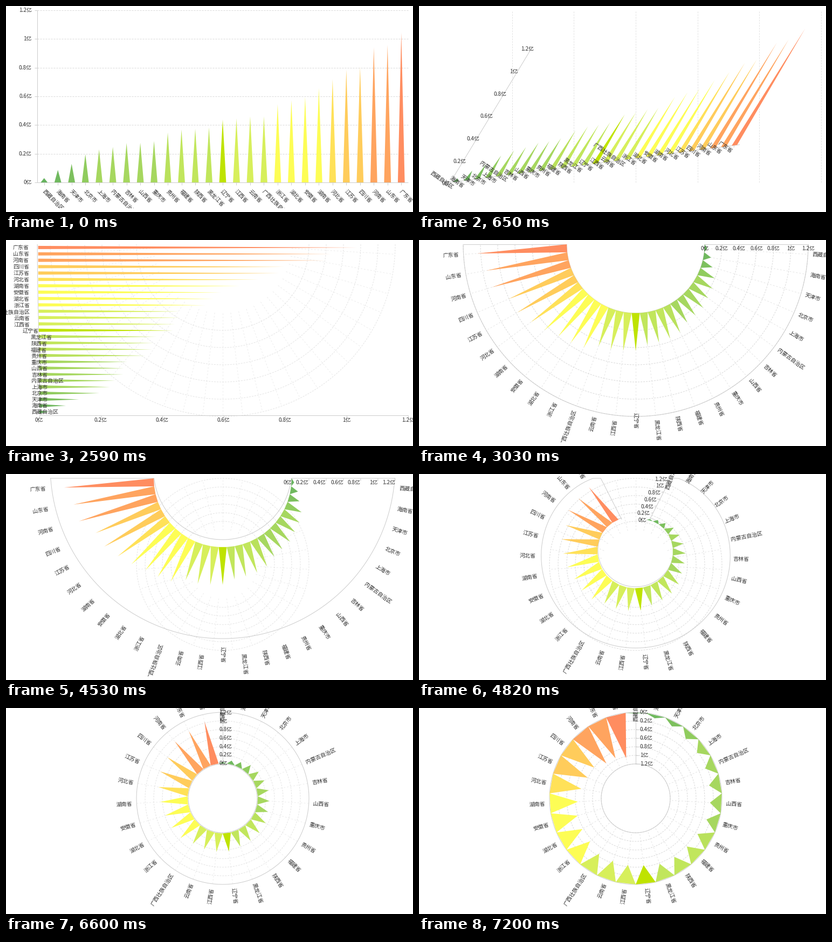
Write a matplotlib script that moves like this. It is 755 by 383 pixels and loops after 8 s.

```python
import numpy as np
import matplotlib.pyplot as plt
from matplotlib.animation import FuncAnimation
from matplotlib.collections import LineCollection, PolyCollection
from matplotlib.patches import Rectangle

W, H, DPI = 755, 383, 100
PX = 72 / DPI
STEP, LOOP = 20, 8000

NAMES = ("西藏自治区 海南省 天津市 北京市 上海市 内蒙古自治区 吉林省 山西省 重庆市 "
         "贵州省 福建省 陕西省 黑龙江省 辽宁省 江西省 云南省 广西壮族自治区 浙江省 "
         "湖北省 安徽省 湖南省 河北省 江苏省 四川省 河南省 山东省 广东省").split()
POP = np.array([300, 867, 1294, 1961, 2302, 2471, 2746, 2760, 2885, 3475, 3689,
                3733, 3831, 4375, 4457, 4597, 4603, 5443, 5724, 5950, 6568,
                7185, 7866, 8042, 9402, 9579, 10430]) / 1e4
COLORS = (["#66b35e", "#70b95f", "#7dc05e", "#90cc5e"] + ["#a6d75f"] * 5
          + ["#b9e15c"] + ["#c1e65c"] * 3 + ["#bfe300"] + ["#d7ef5b"] * 3
          + ["#fdfd55"] * 4 + ["#ffe158"] + ["#ffcc5b"] * 2
          + ["#ffa45f"] * 2 + ["#ff8d60"])
N = len(NAMES)
TICKS = np.arange(7) * 0.2
TICK_TEXT = [f"{v:.1f}".replace(".0", "") + "亿" for v in TICKS]
MID = np.arange(N) + 0.5
TOP = 8


def polar(cx, cy, r, deg):
    a = np.radians(deg)
    return np.stack(np.broadcast_arrays(cx + r * np.cos(a), cy + r * np.sin(a)), -1)


def xy(x, y):
    return np.stack(np.broadcast_arrays(x, y), -1).astype(float)


# Each layout maps (category position 0..27, value 0..1.2) to the stage.
def columns(u, v):
    return xy(58 + u * 688 / N, 328 - v * 320 / 1.2)


def rows(u, v):
    return xy(58 + v * 688 / 1.2, 328 - u * 320 / N)


def fan(u, v):
    return polar(402, TOP, 128 + 160 * v, u * 180 / N)


def ring(u, v):
    return polar(402, 168, 64 + 80 * v, (u - 0.5) * 360 / N - 90)


def inner_ring(u, v):
    return ring(u, 1.2 - v)


def ring_labels(cy, r, deg):
    pos = polar(402, cy, r + 8, deg)
    side = np.round(np.cos(np.radians(deg)), 6)
    rot = np.where(side >= 0, -deg, 180 - deg)
    align = ["left" if s > 0 else "right" if s < 0 else "center" for s in side]
    return pos, rot, align


def make_state(pt, half, u0, rim, tick, val_pos, val_align, labels, spokes=False):
    """Geometry of one finished chart."""
    u = np.linspace(u0, u0 + N, 109)
    bars = np.stack([pt(MID - half, 0 * POP), pt(MID, POP), pt(MID + half, 0 * POP)], 1)
    ends = pt(u0, TICKS)
    axes = [pt(u0, np.array([0, 1.2])), pt(u, rim)]
    if spokes:
        axes += [pt(u, 1.2 - rim), pt(u0 + N, np.array([0, 1.2]))]
    grid = [pt(u, v) for v in TICKS[1:]]
    rays = [pt(m, np.array([0, 1.2])) for m in MID] if spokes else []
    pos, rot, align = labels
    marks = np.stack([ends, ends + tick], 1)
    return dict(bars=bars, axes=axes, grid=grid, rays=rays, marks=marks,
                vpos=val_pos(ends), valign=val_align, pos=pos, rot=rot, align=align)


base = columns(MID, 0)
side = rows(MID, 0)
fan_text = ring_labels(TOP, 320, MID * 180 / N)
ring_text = ring_labels(168, 160, np.arange(N) * 360 / N - 90)

STATES = [
    make_state(columns, 0.25, 0, 0, (-5, 0), lambda e: e - (10, 0), "right",
               (base + (-2, 15), np.full(N, -45.0), ["left"] * N)),
    make_state(rows, 0.25, 0, 0, (0, 5), lambda e: e + (0, 10), "center",
               (side - (15.5, 0), np.zeros(N), ["right"] * N)),
    make_state(fan, 0.5, 0, 1.2, (0, 5), lambda e: e + (0, 8), "center",
               fan_text, True),
    make_state(ring, 0.5, 0.5, 1.2, (-5, 0), lambda e: e - (7, 0), "right",
               ring_text, True),
    make_state(inner_ring, 0.5, 0.5, 0, (5, 0), lambda e: e + (8, 0), "left",
               ring_text, True),
]
# Category ticks exist only on the straight axes.
STATES[0]["cat"] = np.stack([base, base + (0, 5)], 1)
STATES[1]["cat"] = np.stack([side, side - (5, 0)], 1)

# Visible steps of every transition and the phase of its first step.
MOVES = [((500, 650, 790, 940, 1090), 0.09),
         ((2590, 2730, 2880, 3030), 0.125),
         ((4530, 4670, 4820, 4960, 5110), 0.05),
         ((6600, 6750, 6900, 7050, 7200), 0.15)]


def ease(k):
    return 4 * k ** 3 if k < 0.5 else 1 - (2 - 2 * k) ** 3 / 2


def progress(t):
    """Return (from, to, eased amount) at time t."""
    now = 0
    for j, (times, k0) in enumerate(MOVES):
        done = sum(t >= x for x in times)
        if done == len(times):
            now = j + 1
        elif done:
            return j, j + 1, ease(min(1, k0 + 0.29 * (done - 1)))
    return now, now, 1


def mix(a, b, p):
    return a + (b - a) * p


fig = plt.figure(figsize=(W / DPI, H / DPI), dpi=DPI, facecolor="white")
ax = fig.add_axes([0, 0, 1, 1])
ax.set(xlim=(0, W), ylim=(H, 0))
ax.axis("off")


def lines(color, z, dash="solid"):
    lc = LineCollection([], colors=color, linewidths=PX, linestyles=dash, zorder=z)
    return ax.add_collection(lc, autolim=False)


def text(s):
    return ax.text(0, 0, s, family="Noto Sans CJK JP", size=10 * PX, color="#333333",
                   va="center", rotation_mode="anchor", zorder=5)


rays = lines("#e6e6e6", 1, (0, (3, 3)))
grid = lines("#d9d9d9", 1, (0, (3, 2)))
axes = lines("#cccccc", 2)
bars = PolyCollection([], facecolors=COLORS, edgecolors="none", zorder=3)
ax.add_collection(bars, autolim=False)
names = [text(s) for s in NAMES]
values = [text(s) for s in TICK_TEXT]
ax.add_patch(Rectangle((0, 376), W, 8, color="white", lw=0, zorder=9))


def draw(n):
    i, j, p = progress(n * STEP + STEP / 2)
    a, b = STATES[i], STATES[j]

    bars.set_verts(mix(a["bars"], b["bars"], p))
    bars.set_facecolor(COLORS[:-1] + ["#fb7a4c" if i == j == 3 else COLORS[-1]])

    paths = [mix(s, e, p) for s, e in zip(a["axes"], b["axes"])]
    if (i, j) == (2, 3):
        # the arcs rise while they close into circles
        for q, lift in zip(paths[1:3], (22, 14)):
            q[:, 1] = np.maximum(q[:, 1] - lift * (1 - p), TOP)
    paths += list(mix(a["marks"], b["marks"], p))
    if "cat" in b:
        paths += list(mix(a["cat"], b["cat"], p))
    axes.set_segments(paths)

    for lc, key in ((grid, "grid"), (rays, "rays")):
        lc.set_segments(b[key])
        lc.set_alpha(0.7 + 0.3 * p)

    pos, rot = mix(a["pos"], b["pos"], p), mix(a["rot"], b["rot"], p)
    align = a["align"] if a["rays"] and p < 0.5 else b["align"]
    for label, q, r, h in zip(names, pos, rot, align):
        label.set(position=q, rotation=r, ha=h)
    for label, q in zip(values, mix(a["vpos"], b["vpos"], p)):
        label.set(position=q, ha=b["valign"])
    return [bars, axes, grid, rays, *names, *values]


anim = FuncAnimation(fig, draw, frames=LOOP // STEP, interval=STEP,
                     repeat=True, repeat_delay=0, blit=False)
plt.show()
```
